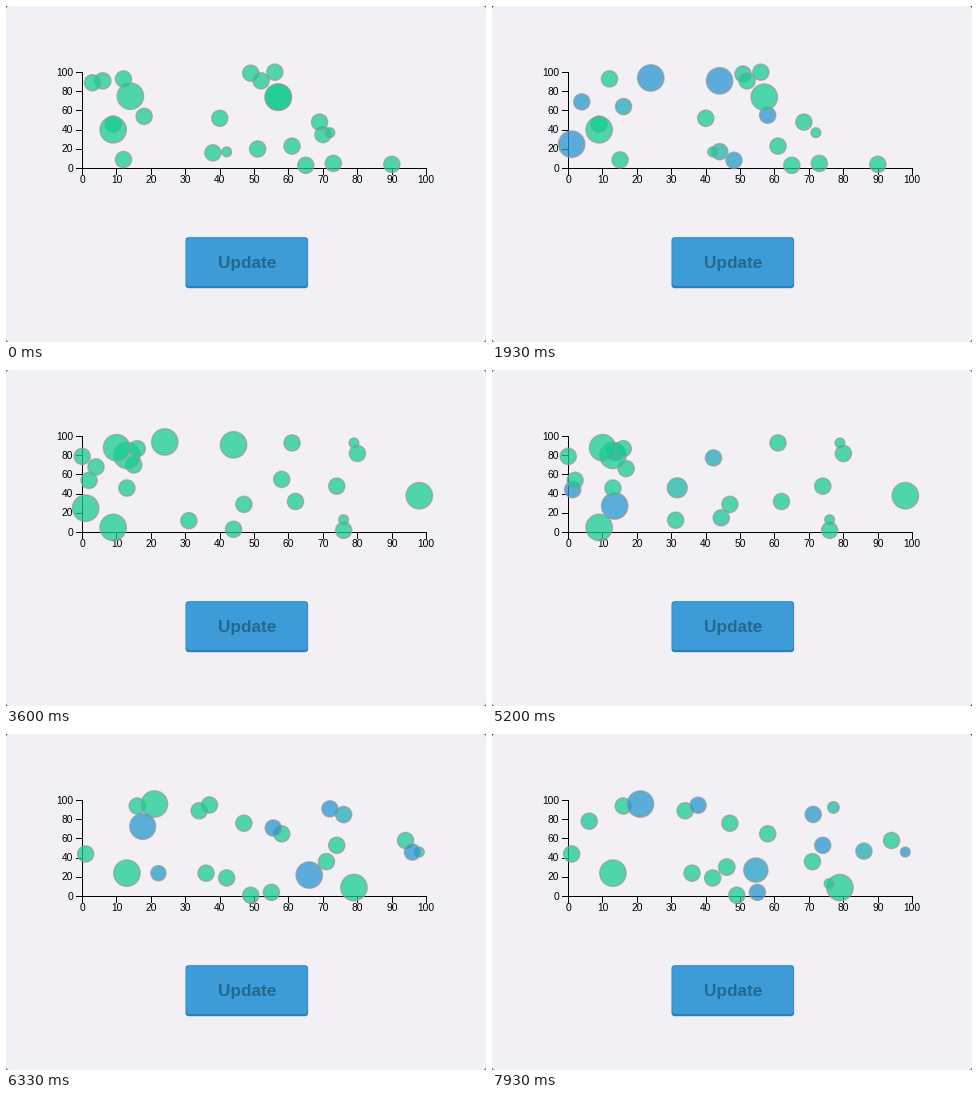
A matplotlib script for the animation above (8000 ms loop, 480 px wide and 336 px high).

```python
import numpy as np
import matplotlib.pyplot as plt
from matplotlib.animation import FuncAnimation
from matplotlib.patches import Circle, FancyBboxPatch

W, H, DPI = 480, 336, 100
LOOP, STEP = 8000, 32
X0, Y0, SX, SY = 76, 162, 3.44, 0.96

# Timing in ms: one bubble's move, stagger, start of each update, turning point
MOVE, STAGGER = 500, 53.5
STARTS = (1340, 4760)
TURN = 6977
FADE_FROM, FADE_TO = 1.26, 1.36

BG = "#f2f0f5"
GREEN = np.array([23, 204, 148]) / 255
BLUE = np.array([40, 149, 211]) / 255
SMALL, MEDIUM, LARGE = 5.5, 8.7, 13.8


def scatter(points, large, small):
    """Rows of x, y, radius; bubbles are medium unless named by index."""
    radius = np.full(len(points), MEDIUM)
    radius[large] = LARGE
    radius[small] = SMALL
    return np.column_stack([points, radius])


# The three data sets the plot moves through
SETS = (
    scatter([(14, 75), (6, 91), (38, 16), (57, 74), (3, 89), (70, 35),
             (18, 54), (51, 20), (49, 99), (12, 9), (69, 48), (9, 46),
             (40, 52), (73, 5), (90, 4), (72, 37), (57, 74), (56, 100),
             (65, 3), (42, 17), (12, 93), (9, 40), (61, 23), (52, 91)],
            large=[0, 3, 16, 21], small=[15, 19]),
    scatter([(44, 91), (24, 94), (1, 25), (58, 55), (4, 68), (44, 3),
             (15, 70), (31, 12), (61, 93), (76, 2), (2, 54), (13, 80),
             (62, 32), (10, 88), (9, 5), (98, 38), (80, 82), (16, 87),
             (13, 46), (74, 48), (79, 93), (0, 79), (47, 29), (76, 13)],
            large=[0, 1, 2, 11, 13, 14, 15], small=[20, 23]),
    scatter([(1, 44), (13, 24), (16, 94), (34, 89), (79, 9), (47, 76),
             (49, 1), (58, 65), (36, 24), (42, 19), (71, 36), (94, 58),
             (21, 96), (55, 4), (74, 53), (98, 46), (37, 95), (76, 85),
             (66, 22), (96, 46), (72, 91), (56, 71), (16, 75), (12, 26)],
            large=[1, 4, 12, 18, 22], small=[15]),
)
COUNT = len(SETS[0])


def pt(px):
    return px * 72 / DPI


def ease(u):
    u = np.clip(u, 0, 1)
    return np.where(u < 0.5, 4 * u ** 3, 1 - 4 * (1 - u) ** 3)


def state(ms):
    """Bubble geometry and fill colours at a time in the loop."""
    ms = min(ms, 2 * TURN - ms)
    k = int(ms >= STARTS[1])
    old, new = SETS[k], SETS[k + 1]
    u = (ms - STARTS[k] - np.arange(COUNT) * STAGGER) / MOVE
    moved = ease(u)[:, None]
    back = np.clip((u - FADE_FROM) / (FADE_TO - FADE_FROM), 0, 1)[:, None]
    return (old + (new - old) * moved,
            GREEN + (BLUE - GREEN) * moved * (1 - back))


plt.rcParams["toolbar"] = "None"
fig = plt.figure(figsize=(W / DPI, H / DPI), dpi=DPI, facecolor="#55555a")
ax = fig.add_axes([0, 0, 1, 1])
ax.set_xlim(0, W)
ax.set_ylim(H, 0)
ax.axis("off")


def rounded(x, y, w, h, r, color, z):
    ax.add_patch(FancyBboxPatch((x, y), w, h, lw=0, fc=color, zorder=z,
                                boxstyle=f"round,pad=0,rounding_size={r}"))


def line(xs, ys):
    ax.plot(xs, ys, color="black", lw=pt(1), zorder=2)


def label(x, y, s, ha, size=10.3, **style):
    ax.text(x, y, s, ha=ha, va="baseline", fontsize=pt(size),
            family="Liberation Sans", zorder=2, **style)


def draw_axes():
    line([X0, X0 + 100 * SX], [Y0, Y0])
    line([X0, X0], [Y0 - 100 * SY, Y0])
    for v in range(0, 101, 10):
        x = X0 + v * SX
        line([x, x], [Y0, Y0 + 6])
        label(x + 0.3, 177, str(v), "center")
    for v in range(0, 101, 20):
        y = Y0 - v * SY
        line([X0 - 6, X0], [y, y])
        label(67.3, y + 3.7, str(v), "right")


def draw_button():
    rounded(179.5, 231.2, 122.6, 51, 3.5, "#2a7fb6", 1)
    rounded(180.2, 232, 121.2, 48, 3, "#3d9bd8", 1.1)
    label(241.3, 262.3, "Update", "center", size=17.2, weight="bold",
          color="#23688f")


rounded(0, 0, W, H, 3, BG, 0)
draw_axes()
draw_button()

bubbles = [ax.add_patch(Circle((0, 0), 1, lw=pt(1.4), zorder=3 + i / 100,
                               ec=(0.58, 0.6, 0.6, 0.7)))
           for i in range(COUNT)]


def update(n):
    geometry, colours = state((n + 0.5) * STEP)
    for bubble, (x, y, r), colour in zip(bubbles, geometry, colours):
        bubble.center = X0 + 0.2 + x * SX, Y0 + 0.2 - y * SY
        bubble.set_radius(r - 0.6)
        bubble.set_facecolor((*colour, 0.75))
    return bubbles


anim = FuncAnimation(fig, update, frames=LOOP // STEP, interval=STEP,
                     repeat=True, repeat_delay=0, blit=False)
plt.show()
```
